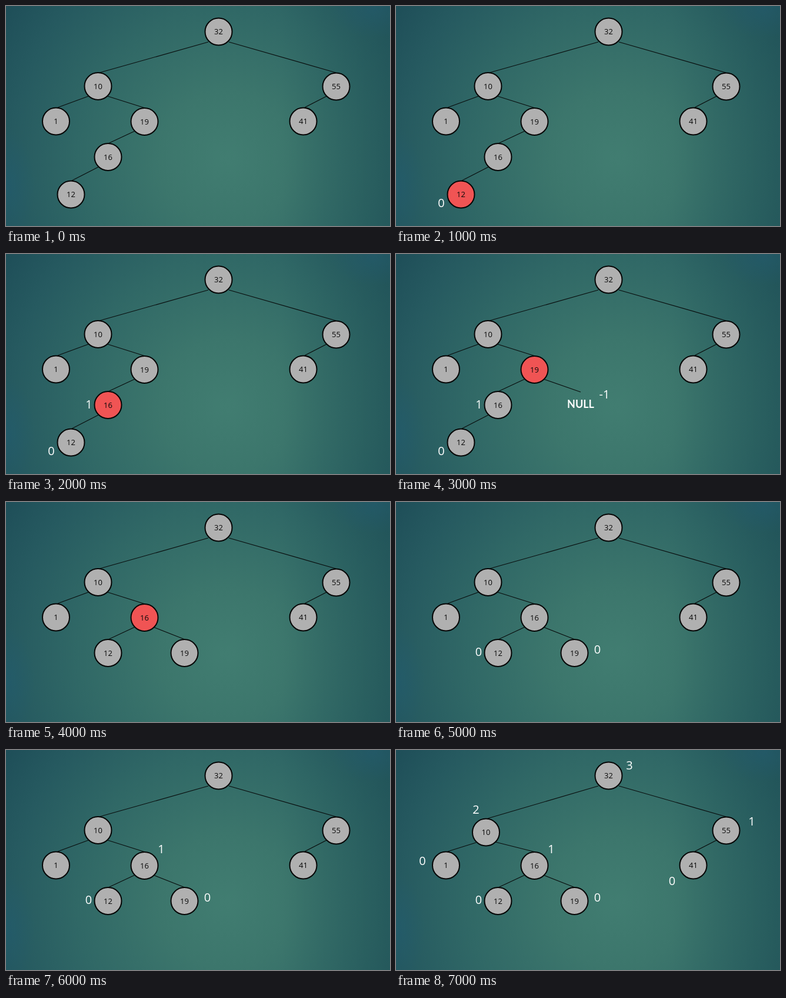
Recreate the animation shown at these times as an HTML page. Size 653 px wide and 373 px high, loop 8000 ms.

```html
<!DOCTYPE html>
<html lang="en">
<head>
<meta charset="utf-8">
<title>Tree rotation</title>
<style>
  html, body { margin: 0; width: 100%; height: 100%; overflow: hidden; }
  body {
    background:
      radial-gradient(ellipse 75px 50px at 625px 4px, rgba(36, 92, 112, .55), transparent),
      radial-gradient(ellipse 50px 95px at 0 305px, rgba(34, 92, 112, .6), transparent),
      linear-gradient(to right, transparent 72%, rgba(26, 74, 80, .4)),
      radial-gradient(circle 470px at 375px 258px,
        #417d71 0%, #3c766c 24%, #306866 54%, #265a60 78%, #1d4c57 100%);
  }
  svg { display: block; width: 653px; height: 373px; }
  line { stroke: #080c0c; stroke-width: 1.15; }
  circle { stroke: #050505; stroke-width: 2; }
  text { font-family: "Open Sans", "Noto Sans", sans-serif; text-anchor: middle; }
  .key { font-size: 13px; fill: #080808; }
  .height { font-size: 20px; fill: #fff; }
  .null { font: 700 18px Lato, sans-serif; fill: #fff; }
</style>
</head>
<body>
<svg id="stage" viewBox="0 0 653 373"></svg>
<script>
const STEP = 1000, STEPS = 8;
const GRAY = '#b0b0b0', RED = '#f05454';
const stage = document.getElementById('stage');
const parts = [];

function add(tag, attrs, from, to, content = '') {
  const el = document.createElementNS('http://www.w3.org/2000/svg', tag);
  for (const name in attrs) el.setAttribute(name, attrs[name]);
  el.textContent = content;
  stage.append(el);
  parts.push({ el, from, to });
  return el;
}

// Parts are visible from step `from` up to, not including, step `to`.
const edge = (x1, y1, x2, y2, from = 0, to = STEPS) =>
  add('line', { x1, y1, x2, y2 }, from, to);

const label = (cls, content, x, y, from = 0, to = STEPS) =>
  add('text', { class: cls, x, y }, from, to, content);

const nodes = [];
function node(key, x, y, from = 0, to = STEPS, red = -1) {
  const el = add('circle', { cx: x, cy: y, r: 23, fill: GRAY }, from, to);
  label('key', key, x, y + 4.8, from, to);
  nodes.push({ el, red });
}

edge(344, 61, 159, 113, 0, 7);
edge(344, 61, 156, 116, 7);
edge(379, 61, 561, 113);
edge(140, 153, 88, 172, 0, 7);
edge(136, 157, 88, 172, 7);
edge(173, 153, 235, 172.5, 0, 7);
edge(169, 156, 235, 172.5, 7);
edge(545, 153, 508, 172);
edge(218, 212.5, 174, 233);
edge(157, 273, 112, 296, 0, 4);
edge(252, 212.5, 314, 234, 3, 4);
edge(252, 212.5, 304, 233, 4);

node(32, 361.5, 43.5);
node(10, 156.5, 136, 0, 7);
node(10, 153, 139.5, 7);
node(55, 561.5, 136.5);
node(1, 85, 195.5);
node(41, 505.5, 195.5);
node(19, 235.5, 196, 0, 4, 3);
node(16, 235.5, 196, 4, STEPS, 4);
node(16, 173.5, 256, 0, 4, 2);
node(12, 173.5, 256, 4);
node(12, 110.5, 319.5, 0, 4, 1);
node(19, 303.5, 256, 4);

label('height', 0, 77, 340.5, 1, 4);
label('height', 1, 141, 261.5, 2, 4);
label('height', '-1', 354.5, 244.5, 3, 4);
label('null', 'NULL', 314, 261, 3, 4);
label('height', 0, 140.5, 261, 5);
label('height', 0, 342.5, 256.5, 5);
label('height', 1, 264, 175, 6);
label('height', 3, 397, 32.5, 7);
label('height', 2, 136, 107.5, 7);
label('height', 0, 45, 194.5, 7);
label('height', 1, 605, 128, 7);
label('height', 0, 469.5, 229, 7);

const start = performance.now();
function draw() {
  const step = Math.floor((performance.now() - start) / STEP) % STEPS;
  for (const { el, from, to } of parts)
    el.style.visibility = step >= from && step < to ? 'visible' : 'hidden';
  for (const { el, red } of nodes)
    el.style.fill = step === red ? RED : GRAY;
  requestAnimationFrame(draw);
}
draw();
</script>
</body>
</html>
```
